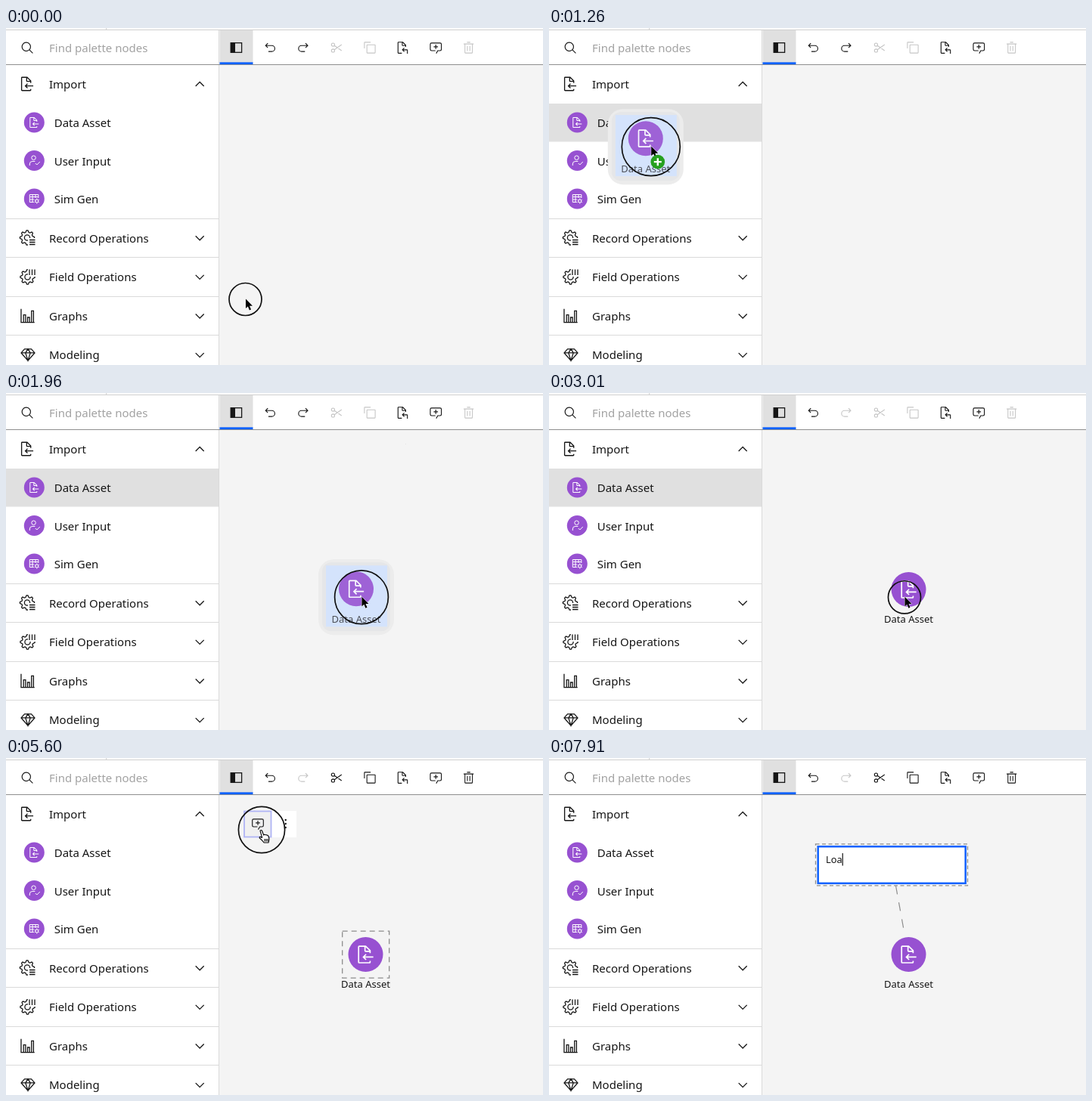
An HTML page that plays this animation: 710 by 446 pixels, repeating every 8000 ms.

```html
<!DOCTYPE html>
<html lang="en">
<head>
<meta charset="utf-8">
<title>Flow editor: add a comment</title>
<style>
html, body { margin: 0; width: 100%; height: 100%; overflow: hidden; background: #f4f4f4; }
svg { display: block; width: 710px; height: 446px; }
text { font: 15px "Noto Sans", "Open Sans", sans-serif; fill: #161616; white-space: pre; }
.label { font-size: 13px; text-anchor: middle; }
.tip text { fill: #fff; font-size: 12.5px; }
.ln { fill: none; stroke: #161616; stroke-width: 1.3; }
.dash { fill: none; stroke: #8d8d8d; stroke-width: 1.3; stroke-dasharray: 7 5; }
</style>
</head>
<body>
<svg id="stage" viewBox="0 0 710 446" xmlns="http://www.w3.org/2000/svg"></svg>
<script>
const LOOP = 8000, INK = '#161616', OFF = '#c6c6c6', BLUE = '#0f62fe', PURPLE = '#9751d1';
const stage = document.getElementById('stage');

// Icons live on a 32 unit grid.
const fold = 'a2 2 0 0 0 2 2h6v2h2V10a1 1 0 0 0-.29-.71l-7-7A1 1 0 0 0 16 2H6a2 2 0 0 0-2 2v24a2 2 0 0 0 2 2';
const icons = {
  import: 'M28 19H14.83l2.58-2.59L16 15l-5 5 5 5 1.41-1.41L14.83 21H28z' +
    'M14 4v6' + fold + 'h16a2 2 0 0 0 2-2v-2h-2v2H6V4zM16 4.41 21.59 10H16z',
  paste: 'M26 20h-8.17l2.58-2.59L19 16l-5 5 5 5 1.41-1.41L17.83 22H26v8h2v-8a2 2 0 0 0-2-2z' +
    'M14 4v6' + fold + 'h8v-2H6V4zM16 4.41 21.59 10H16z',
  undo: 'M20 10H7.81l3.59-3.59L10 5l-6 6 6 6 1.4-1.41L7.82 12H20a6 6 0 0 1 0 12h-8v2h8a8 8 0 0 0 0-16z',
  redo: 'M12 10h12.19L20.6 6.41 22 5l6 6-6 6-1.4-1.41L24.18 12H12a6 6 0 0 0 0 12h8v2h-8a8 8 0 0 1 0-16z',
  copy: 'M28 10v18H10V10zm0-2H10a2 2 0 0 0-2 2v18a2 2 0 0 0 2 2h18a2 2 0 0 0 2-2V10a2 2 0 0 0-2-2z' +
    'M4 18H2V4a2 2 0 0 1 2-2h14v2H4z',
  comment: 'M17.74 30 16 29l4-7h6a2 2 0 0 0 2-2V8a2 2 0 0 0-2-2H6a2 2 0 0 0-2 2v12a2 2 0 0 0 2 2h9v2H6' +
    'a4 4 0 0 1-4-4V8a4 4 0 0 1 4-4h20a4 4 0 0 1 4 4v12a4 4 0 0 1-4 4h-4.84zM17 9h-2v4h-4v2h4v4h2v-4h4v-2h-4z',
  trash: 'M12 12h2v12h-2zM18 12h2v12h-2zM4 6v2h2v20a2 2 0 0 0 2 2h16a2 2 0 0 0 2-2V8h2V6zM8 28V8h16v20zM12 2h8v2h-8z',
  search: 'M29 27.59l-7.55-7.55a11 11 0 1 0-1.41 1.41L27.59 29zM4 13a9 9 0 1 1 9 9 9 9 0 0 1-9-9z'
};
const strokes = {
  cut: 'M11 11 28 23M11 21 28 9M11.5 9a3.7 3.7 0 1 1-7.4 0 3.7 3.7 0 1 1 7.4 0M11.5 23a3.7 3.7 0 1 1-7.4 0 3.7 3.7 0 1 1 7.4 0',
  user: 'M20 8.500a5.500 5.500 0 1 1-11 0 5.500 5.500 0 1 1 11 0M4 29v-4a7 7 0 0 1 7-7h7M19 23l4 4 8-8',
  sim: 'M15 25H4V5h23v9M4 11h23M11.500 5v20M19.500 5v9M4 18h11M27 22a4 4 0 1 1-8 0 4 4 0 1 1 8 0' +
    'M23 15v3M23 26v3M17 18.500l2.500 1.500M26.500 24l2.500 1.500M17 25.500l2.500-1.500M26.500 20l2.500-1.500',
  chart: 'M3 2v27h27M8 29V14h4v15M16 29V19h4v10M24 29V6h4v23',
  gem: 'M9 4h14l7 8-14 16L2 12zM2 12h28M11 12l5 16 5-16-5-8z'
};

const box = (x, y, w, h, fill, more = '') =>
  `<rect x="${x}" y="${y}" width="${w}" height="${h}" fill="${fill}" ${more}/>`;
const dot = (x, y, r, fill, more = '') => `<circle cx="${x}" cy="${y}" r="${r}" fill="${fill}" ${more}/>`;
const path = (d, more = 'class="ln"') => `<path d="${d}" ${more}/>`;
const text = (x, y, str, more = '') => `<text x="${x}" y="${y}" ${more}>${str}</text>`;
const group = (id, inner, more = '') => `<g id="${id}" ${more}>${inner}</g>`;

function icon(name, x, y, size, color = INK, id = '') {
  const k = size / 32, place = `transform="translate(${x - size / 2} ${y - size / 2}) scale(${k})"`;
  return icons[name]
    ? path(icons[name], `id="${id}" fill="${color}" fill-rule="evenodd" ${place}`)
    : path(strokes[name], `id="${id}" fill="none" stroke="${color}" stroke-width="2" ${place}`);
}

function gear(cx, cy) {
  let d = '';
  for (let i = 0; i < 32; i++) {
    const a = (i - 1.5) / 32 * 2 * Math.PI, r = i % 4 === 1 || i % 4 === 2 ? 9.6 : 7.3;
    d += `${i ? 'L' : 'M'}${cx + r * Math.cos(a)} ${cy + r * Math.sin(a)}`;
  }
  return path(d + 'Z') + dot(cx, cy, 3.6, 'none', 'class="ln"');
}

const chevron = (y, up) => path(up ? `M250.700 ${y + 2.7}l5.500-5.500 5.500 5.500` : `M250.700 ${y - 2.7}l5.500 5.500 5.500-5.500`);

function palette() {
  let out = box(0, 0, 282, 446, '#fff') + box(0, 100, 281, 50.5, '#e0e0e0', 'id="hover"');
  out += icon('search', 28.5, 26.5, 18) + text(57, 32, 'Find palette nodes', 'style="fill:#a2a2a2"');
  out += icon('import', 28, 74, 21.5) + text(57, 80, 'Import') + chevron(74.3, true);
  [['Data Asset', 'import'], ['User Input', 'user'], ['Sim Gen', 'sim']].forEach(([name, ic], i) => {
    const y = 125 + i * 50.5;
    out += dot(37.3, y, 13.5, PURPLE) + icon(ic, 37.3, y, 16, '#fff') + text(63.7, y + 6, name);
  });
  ['Record Operations', 'Field Operations', 'Graphs', 'Modeling'].forEach((name, i) => {
    const y = 278 + i * 51.6;
    out += box(0, Math.round(y - 26.5), 281, 1, '#dadada') + text(57, y + 5.5, name) + chevron(y, false);
  });
  out += gear(28, 277.5) + box(29, 278, 11, 12, '#fff') + path('M31 280.500h7.500M31 283.500h7.500M31 286.500h7.500');
  out += gear(28.5, 329.5) + box(29, 317, 11, 12, '#fff') + path('M31 319.500v7.500M34.500 319.500v7.500M38 319.500v7.500');
  out += icon('chart', 28.5, 381, 21) + icon('gem', 29, 432.5, 20.5);
  return out + box(281, 49, 1, 397, '#dadada');
}

function toolbar() {
  const y = 26;
  return box(282, 0, 428, 48, '#fff') + box(0, 2, 710, 1, '#cfcfcf') + box(132, 0, 1, 2, '#cfcfcf') +
    box(281, 3, 1, 45, '#dadada') + box(0, 48, 710, 1, '#8f8f8f') +
    box(282.5, 3, 44, 43, '#e0e0e0') + box(282.5, 45.3, 44, 2.8, BLUE) +
    box(297.2, 19.7, 14.4, 12.6, 'none', `stroke="${INK}" stroke-width="1.3"`) + box(297, 19.7, 6, 12.6, INK) +
    box(328.8, 5, 41.4, 42, '#ececec', `id="focus" stroke="${BLUE}" stroke-width="2"`) +
    icon('undo', 349.2, y, 18) + icon('redo', 393, y, 18, INK, 'redo') +
    icon('cut', 437, y, 18, OFF, 'cut') + icon('copy', 481, y, 17.5, OFF, 'copy') +
    icon('paste', 524.5, y, 18) + icon('comment', 568.3, y, 18) + icon('trash', 611.7, y, 17.5, OFF, 'trash');
}

const node = (x, y) => dot(x, y, 23, PURPLE) + icon('import', x, y, 27, '#fff');

const tip = path('M293 119.500l-6.500 6.500 6.500 6.500z', 'fill="#393939"') + box(292.5, 65.3, 235.5, 122, '#393939', 'rx="2"') +
  text(311, 94, 'Import', 'style="font-size:10.7px"') +
  text(311, 113.3, 'Data Asset', 'style="font-weight:700"') +
  ['Pull in data from remote data', 'sources using connections, or', 'pull in data from a file.']
    .map((line, i) => text(311, 134 + i * 15.8, line)).join('');

const bar = box(315, 70, 69, 35, '#fff') + box(315, 70, 36, 34.5, '#f0f0f0', 'id="barHover"') +
  box(315, 70.5, 35.5, 34, 'none', 'id="barFocus" stroke="#b0b4f5" stroke-width="1.8"') +
  icon('comment', 333, 87, 18) + [82, 87, 92].map(y => dot(369.7, y, 1.2, INK)).join('');

const note = path('M458.500 169l10.500 58', 'fill="none" stroke="#8d8d8d" stroke-width="1.2" stroke-dasharray="11.5 11"') +
  box(352.5, 113.8, 201, 55, '#f4f4f4', 'id="noteSel" class="dash" style="stroke-dasharray:5 3.500"') +
  box(355.7, 117.2, 195, 48.6, '#fff', 'id="noteBox"') +
  text(366, 139, '', 'id="typed" style="font-size:12.8px;font-weight:500"') + box(0, 126, 1.2, 16.5, INK, 'id="caret"');

// Drawn relative to the pointer ring's centre.
const ghost = box(-57, -50, 100, 100, '#ececec', 'rx="20"') + box(-52, -46, 90, 91, '#e5e6e8', 'rx="12"') +
  box(-47, -42, 81, 81, '#d4e3fc') + group('', node(-7, -11), 'opacity=".88"') +
  text(-7, 33.5, 'Data Asset', 'class="label" style="fill:#4d5058"');

const outline = 'stroke="#fff" stroke-width="1" stroke-linejoin="round" paint-order="stroke"';
const pointer = dot(0, 0, 22, 'none', 'id="ring" stroke-width="1.7"') +
  path('M.5-1V13l3.200-3 2.300 5.600 2.400-1-2.300-5.400h4.400z', `id="arrow" fill="#000" transform="translate(0 .4) scale(.9)" ${outline}`) +
  path('M-2 1.200q1.500-1.500 2.600.3l2 5.500 1-.8 1.800.5 1.500.2 1.500.7q1.500 2 1.500 5l-.8 4.400h-6q-2.500-3.500-5.800-6-.6-1.800 1-1.600l2.300 1z' +
    'M4 12v3.500M6 12v3.500M8 12v3.500', 'id="hand" fill="#fff" stroke="#000" stroke-width="1.1" stroke-linejoin="round"') +
  group('plus', dot(9, 20, 9.3, '#26a01f') + path('M9 15v10M4 20h10', 'stroke="#fff" stroke-width="2.4"'));

stage.innerHTML = box(0, 0, 710, 446, '#f4f4f4') + palette() + toolbar() +
  group('bar', bar) + group('note', note) +
  group('node', node(475.5, 260) + text(475.5, 304.2, 'Data Asset', 'class="label"')) +
  box(444.7, 229.2, 62, 62, 'none', 'id="nodeSel" class="dash"') +
  group('tip', tip, 'class="tip"') + group('ghost', ghost) + group('pointer', pointer);

const el = {};
stage.querySelectorAll('[id]').forEach(e => { if (e.id) el[e.id] = e; });

// time, x, y
const route = [
  [0, 316.5, 359], [60, 316.5, 359], [210, 215, 417], [350, 75, 330], [460, 32, 190], [560, 29, 114.5],
  [1060, 29, 114.5], [1190, 70, 130], [1330, 205, 186], [1540, 373.5, 249], [1680, 436, 264], [1890, 470, 270.3],
  [3010, 470, 270.3], [3080, 472, 270], [3220, 472, 270], [3600, 408, 182], [3990, 349.5, 108.5],
  [4760, 349.5, 108.5], [5110, 338, 95], [5600, 338, 95], [5740, 360, 111], [6160, 360, 111],
  [6370, 395, 133], [LOOP, 395, 133]
];
// time, ring radius
const sizes = [
  [0, 21.5], [1060, 21.5], [1190, 38.5], [1930, 38.5], [2100, 21.5], [3010, 21.5], [3080, 24], [3220, 21.5],
  [5530, 21.5], [5600, 30.5], [5670, 36], [5740, 21.5], [6440, 21.5], [6510, 30], [6580, 22], [6650, 30],
  [6790, 21.5], [LOOP, 21.5]
];
const typing = [[7630, 'L'], [7770, 'Lo'], [7910, 'Loa']];

const segment = (keys, t) => Math.max(0, keys.findIndex(k => k[0] > t) - 1);

function radius(t) {
  const i = segment(sizes, t), [a, ra] = sizes[i], [b, rb] = sizes[i + 1];
  return ra + (rb - ra) * (t - a) / (b - a);
}

// Smooth curve through the route that comes to rest at every pause.
function slope(i, c) {
  const p = route[i - 1], k = route[i], n = route[i + 1];
  const still = (a, b) => a[1] === b[1] && a[2] === b[2];
  return !p || !n || still(p, k) || still(k, n) ? 0 : (n[c] - p[c]) / (n[0] - p[0]);
}
function along(t, c) {
  const i = segment(route, t), a = route[i], b = route[i + 1], d = b[0] - a[0], u = (t - a[0]) / d;
  const v = 1 - u;
  return a[c] * v * v * (1 + 2 * u) + b[c] * u * u * (3 - 2 * u) +
    d * u * v * (slope(i, c) * v - slope(i + 1, c) * u);
}

const show = (name, on) => { el[name].style.display = on ? '' : 'none'; };
const during = (t, a, b) => t >= a && t < b;
const clamp = v => Math.min(1, Math.max(0, v));

function draw(t) {
  const x = along(t, 1), y = along(t, 2), at = `translate(${x} ${y})`;

  const row = t < 560 ? Math.floor((y - 100) / 50.5) : 0;
  show('hover', t < 3220 && (t >= 560 || x < 282) && row >= 0 && row < 3);
  el.hover.setAttribute('y', 100 + row * 50.5);
  show('focus', during(t, 420, 910));
  el.tip.style.opacity = clamp((t - 665) / 70) * clamp((980 - t) / 70);

  el.redo.setAttribute('fill', t < 2310 ? INK : OFF);
  const tool = t < 3220 ? OFF : INK;
  el.cut.setAttribute('stroke', tool);
  el.copy.setAttribute('fill', tool);
  el.trash.setAttribute('fill', tool);

  show('ghost', during(t, 1120, 2310));
  el.ghost.setAttribute('transform', at);
  show('plus', during(t, 1260, 1960));
  show('node', t >= 2310);
  show('nodeSel', during(t, 3220, 6650));

  show('bar', during(t, 4410, 5740));
  show('barHover', t >= 4970);
  show('barFocus', t >= 5530);

  const editing = t >= 6650;
  show('note', t >= 5740);
  show('noteSel', editing);
  el.noteBox.setAttribute('stroke', editing ? BLUE : '#a8a8a8');
  el.noteBox.setAttribute('stroke-width', editing ? 2.5 : 1);
  const str = typing.reduce((s, [when, word]) => t >= when ? word : s, '');
  if (el.typed.textContent !== str) el.typed.textContent = str;
  show('caret', t >= 6790);
  el.caret.setAttribute('x', 366 + (str ? el.typed.getComputedTextLength() : 0));

  show('pointer', t < 7350);
  el.pointer.setAttribute('transform', at);
  el.ring.setAttribute('r', radius(t));
  el.ring.setAttribute('stroke', during(t, 4340, 4480) ? '#22b922' : '#111');
  const hand = during(t, 4970, 5690);
  show('hand', hand);
  show('arrow', !hand);
}

const start = performance.now();
function tick() {
  draw((performance.now() - start) % LOOP);
  requestAnimationFrame(tick);
}
tick();
</script>
</body>
</html>
```
